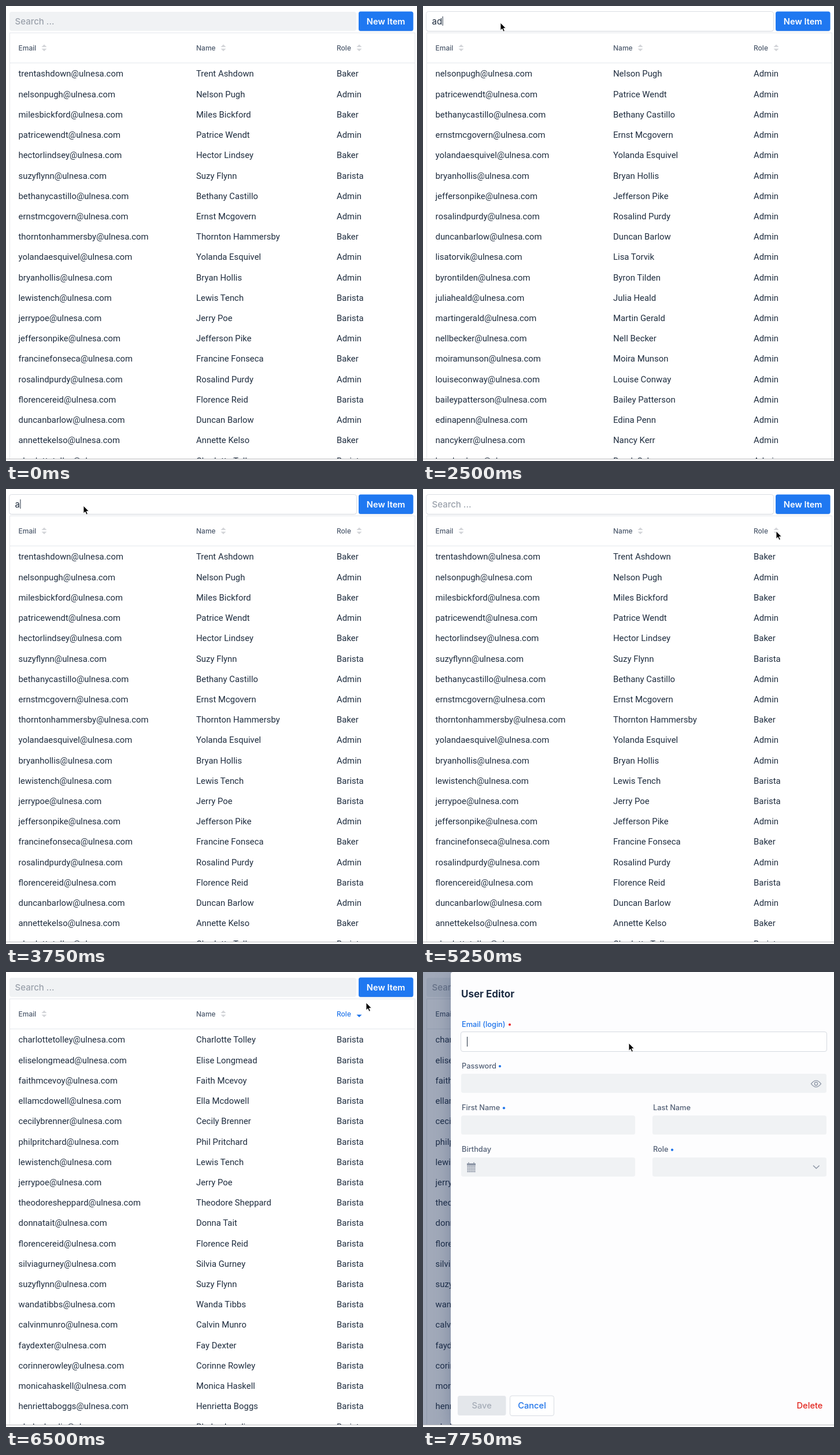
An HTML page that plays this animation: 711 by 787 pixels, repeating every 8 s.

```html
<!DOCTYPE html>
<html lang="en">
<head>
<meta charset="utf-8">
<title>User table</title>
<style>
  html, body { margin: 0; width: 100%; height: 100%; overflow: hidden; background: #fff; }
  svg { display: block; width: 100%; height: 100%; }
  text { font-family: Inter, "Noto Sans", sans-serif; white-space: pre; }
  .row { font: 14.9px Roboto, sans-serif; fill: #1f2d3f; }
  .head { font-size: 12px; font-weight: 500; fill: #4b586b; }
  .input { font-size: 15px; fill: #1f2d3f; }
  .btn { font-size: 14.67px; font-weight: 500; }
  .label { font-size: 12.8px; font-weight: 500; fill: #536076; }
  .title { font-size: 17px; font-weight: 700; fill: #1c2b42; }
  .sheet { filter: drop-shadow(0 8px 14px rgba(30, 50, 95, .28)); }
</style>
</head>
<body>
<svg id="stage" viewBox="0 0 711 787"></svg>
<script>
const LOOP = 8000, STEP = 250, PITCH = 35.22, VISIBLE = 20;
const BLUE = '#1f74ea', GREY = '#f0f2f4', ICON = '#8c95a5', LINE = '#e4e7ec';
const ROLES = { A: 'Admin', B: 'Baker', R: 'Barista' };

const people = `B Trent Ashdown,A Nelson Pugh,B Miles Bickford,A Patrice Wendt,B Hector Lindsey,
R Suzy Flynn,A Bethany Castillo,A Ernst Mcgovern,B Thornton Hammersby,A Yolanda Esquivel,
A Bryan Hollis,R Lewis Tench,R Jerry Poe,A Jefferson Pike,B Francine Fonseca,
A Rosalind Purdy,R Florence Reid,A Duncan Barlow,B Annette Kelso,R Charlotte Tolley,
A Lisa Torvik,A Byron Tilden,A Julia Heald,A Martin Gerald,A Nell Becker,
A Moira Munson,A Louise Conway,A Bailey Patterson,A Edina Penn,A Nancy Kerr,
A Brock Selwyn,A Ivy Huntingham,A Cristobal Walden,A Maximillian Dudley,A Walter Dobson,
A Peter Lunn,A Winston Barham,A Dora Weaver,A Tina Bergson,R Elise Longmead,
R Faith Mcevoy,R Ella Mcdowell,R Cecily Brenner,R Phil Pritchard,R Theodore Sheppard,
R Donna Tait,R Silvia Gurney,R Wanda Tibbs,R Calvin Munro,R Fay Dexter,
R Corinne Rowley,R Monica Haskell,R Henrietta Boggs,R Phelps Landis`
  .split(',').map(entry => {
    const [role, first, last] = entry.trim().split(' ');
    return [(first + last).toLowerCase() + '@ulnesa.com', first + ' ' + last, ROLES[role]];
  });

const ascending = [31, 32, 6, 7, 9, 10, 33, 34, 13, 15, 35, 17, 36, 20, 21, 37, 38, 22, 3, 23];
const descending = [19, 39, 40, 41, 42, 43, 11, 12, 44, 45, 16, 46, 5, 47, 48, 49, 50, 51, 52, 53];

// [time, search text]
const typing = [[1750, ''], [2250, 'a'], [2500, 'ad'], [2750, 'adm'], [3000, 'admin'],
  [3500, 'adm'], [3750, 'a'], [4000, '']];
// [time, x, y]
const path = [[500, 696, 764], [1500, 134, 29], [4250, 134, 29], [5250, 611, 73], [5500, 611, 73],
  [6000, 605, 75], [6250, 605, 75], [6750, 641, 31], [7750, 356, 123]];

const stage = document.getElementById('stage');

function set(el, attrs) {
  for (const k in attrs) el.setAttribute(k, attrs[k]);
  return el;
}
function add(parent, tag, attrs = {}) {
  return parent.appendChild(set(document.createElementNS('http://www.w3.org/2000/svg', tag), attrs));
}
function box(parent, x, y, width, height, attrs) {
  return add(parent, 'rect', { x, y, width, height, ...attrs });
}
function label(parent, x, y, cls, str, attrs = {}) {
  const el = add(parent, 'text', { x, y, class: cls, ...attrs });
  el.textContent = str;
  return el;
}
function show(el, on) { el.style.display = on ? '' : 'none'; }

// Toolbar
const shade = box(stage, 5.5, 10, 601, 34.5, { rx: 4, fill: '#e3e6ea' });
const field = box(stage, 6, 10, 600, 33, { rx: 4 });
const hint = label(stage, 15.5, 32, 'input', 'Search ...', { 'font-weight': 500 });
const query = label(stage, 15.5, 32, 'input', '');
const caret = box(stage, 16, 18, 1, 16, { fill: '#1f2d3f' });
box(stage, 610, 10.5, 94.5, 33.5, { rx: 3.5, fill: '#c3d3ea' });
const button = box(stage, 610, 9.5, 94.5, 33.5, { rx: 3.5 });
label(stage, 657.2, 31.8, 'btn', 'New Item', { fill: '#fff', 'text-anchor': 'middle', style: 'font-weight:600' });

// Table
box(stage, 6.5, 46.5, 701, 745, { fill: '#fff', stroke: LINE });
box(stage, 7, 98, 700, 1, { fill: LINE });
const columns = [21.5, 329, 572];
const heads = ['Email', 'Name', 'Role'].map((str, i) => {
  const x = [66, 376, 611][i];
  return {
    text: label(stage, columns[i], 77, 'head', str),
    up: add(stage, 'path', { d: `M${x - 4.5} 71h9l-4.5-4.5z` }),
    down: add(stage, 'path', { d: `M${x - 4.5} 73.7h9l-4.5 4.5z` })
  };
});
const cells = Array.from({ length: VISIBLE }, (_, i) =>
  columns.map(x => label(stage, x, 122.4 + i * PITCH, 'row', '')));

// Editor
const veil = box(stage, 0, 0, 711, 783, { fill: '#142850' });
const panel = add(stage, 'g');
box(panel, 48, 0, 669, 783, { rx: 4, fill: '#fdfdfe', class: 'sheet' });
label(panel, 66, 44.4, 'title', 'User Editor');

function input(str, x, y, width, dot) {
  const text = label(panel, x + 1, y - 9.3, 'label', str);
  if (dot) add(panel, 'circle', { cx: dot, cy: y - 13, r: 2.1, fill: BLUE });
  return { text, rect: box(panel, x, y, width, 33, { rx: 3.5, fill: GREY }) };
}
const login = input('Email (login)', 66, 104, 632);
const loginDot = add(panel, 'circle', { cx: 150, cy: 91, r: 2.1 });
const loginCaret = box(panel, 76, 112, 1, 17, { fill: '#1f2d3f' });
input('Password', 66, 176, 632, 133);
input('First Name', 66, 248.3, 301, 140);
input('Last Name', 397, 248.3, 301);
input('Birthday', 66, 320.7, 301);
input('Role', 397, 320.7, 301, 431);

const line = { fill: 'none', stroke: ICON, 'stroke-width': 1.3 };
add(panel, 'path', { d: 'M671.5 193.3q8.5-11 17 0q-8.5 11-17 0z', ...line });
add(panel, 'circle', { cx: 680, cy: 193.3, r: 2.7, ...line });
add(panel, 'path', { d: 'M675 334.8l5.3 5l5.3-5', ...line, 'stroke-width': 1.5 });
box(panel, 76, 331, 15, 3.5, { fill: ICON });
add(panel, 'path', { d: 'M79 329v3M88 329v3', ...line });
add(panel, 'path', { d: 'M76.5 336.2h14M76.5 339.2h14M76.5 342.2h14M76.5 345.2h14', ...line,
  'stroke-width': 2, 'stroke-dasharray': '2.2 .75' });

box(panel, 60, 733, 83.5, 34, { rx: 3.5, fill: '#e4e7eb' });
label(panel, 101.7, 755.4, 'btn', 'Save', { fill: '#a5acb7', 'text-anchor': 'middle' });
box(panel, 150.5, 733, 76, 34.5, { rx: 3.5, fill: '#fff', stroke: '#d8dce2' });
label(panel, 188.5, 755.4, 'btn', 'Cancel', { fill: BLUE, 'text-anchor': 'middle' });
label(panel, 646.5, 755.4, 'btn', 'Delete', { fill: '#e3261f' });

// Bottom edge and pointer
box(stage, 0, 783, 711, 4, { fill: '#fff' });
box(stage, 0, 783, 711, 1, { fill: '#b8b9bb' });
const pointer = add(stage, 'path', {
  d: 'M0 0V13.2L3 10.4L5.1 15.3L7.4 14.3L5.3 9.6H9.4Z',
  fill: '#000', stroke: '#fff', 'stroke-width': .9
});

function pointerAt(t) {
  const i = Math.max(1, path.findIndex(p => p[0] >= t));
  const end = path[path.length - 1];
  if (t >= end[0]) return end.slice(1);
  const [t0, x0, y0] = path[i - 1], [t1, x1, y1] = path[i];
  const p = (t - t0) / (t1 - t0), k = p * p * (3 - 2 * p);
  return [x0 + (x1 - x0) * k, y0 + (y1 - y0) * k];
}

function rowsAt(t, str) {
  if (t >= 6250) return descending.map(i => people[i]);
  if (t >= 5500) return ascending.map(i => people[i]);
  return people.filter(p => p.some(s => s.toLowerCase().includes(str)));
}

function drawSearch(t) {
  const focus = t >= 1750 && t < 5500;
  const [since, str] = typing.filter(e => e[0] <= t).pop() || [0, ''];
  show(shade, focus);
  set(field, focus
    ? { x: 5.5, y: 9.5, width: 601, height: 34, fill: t < 2000 ? '#fafbfb' : '#fff', stroke: '#dadee4' }
    : { x: 6, y: 10, width: 600, height: 33, fill: t === 5500 ? '#f6f7f9' : GREY, stroke: 'none' });
  show(hint, !str);
  hint.style.fill = focus && t < 5250 ? '#c3c8cf' : '#9aa1ab';
  query.textContent = str;
  set(caret, { x: str ? 16 + query.getComputedTextLength() : 15.5 });
  show(caret, focus && t < 5250 && (t - since) % 1000 < 500);
  return str;
}

function drawTable(t, str) {
  const list = rowsAt(t, str);
  cells.forEach((row, i) => row.forEach((cell, j) => { cell.textContent = list[i] ? list[i][j] : ''; }));
  heads.forEach((h, i) => {
    const sorted = i === 2 && t >= 5500;
    h.text.style.fill = sorted ? BLUE : '';
    set(h.up, { fill: sorted ? BLUE : '#d3d5d9' });
    set(h.down, { fill: sorted ? BLUE : '#d3d5d9' });
    show(h.up, !sorted || t < 6250);
    show(h.down, !sorted || t >= 6250);
  });
}

function drawEditor(t) {
  const p = Math.min(1, Math.max(0, (t - 6700) / 600));
  const e = 1 - (1 - p) ** 3, s = .8 + .2 * e;
  const focus = t >= 7000;
  show(panel, e > 0);
  set(veil, { opacity: .4 * e * e });
  set(panel, {
    opacity: e,
    transform: `translate(${382.5 * (1 - s)} ${391.5 * (1 - s) + 7 * (1 - e)}) scale(${s})`
  });
  set(login.rect, focus
    ? { x: 65.5, y: 103.5, width: 633, height: 34, fill: '#fff', stroke: '#d5d9e0' }
    : { x: 66, y: 104, width: 632, height: 33, fill: '#fadbe0', stroke: 'none' });
  login.text.style.fill = focus ? BLUE : '';
  set(loginDot, { fill: focus ? '#e8252a' : '#536076' });
  show(loginCaret, (t - 6750) % 1000 < 500);
}

function draw(time) {
  const t = Math.floor(time % LOOP / STEP) * STEP;
  drawTable(t, drawSearch(t));
  drawEditor(t);
  set(button, { fill: t >= 6750 ? '#1d72e6' : '#1f78f1' });
  const [x, y] = pointerAt(t);
  show(pointer, t >= 500);
  set(pointer, { transform: `translate(${x} ${y})` });
}

const start = performance.now();
function tick() {
  draw(performance.now() - start);
  requestAnimationFrame(tick);
}
tick();
</script>
</body>
</html>
```
